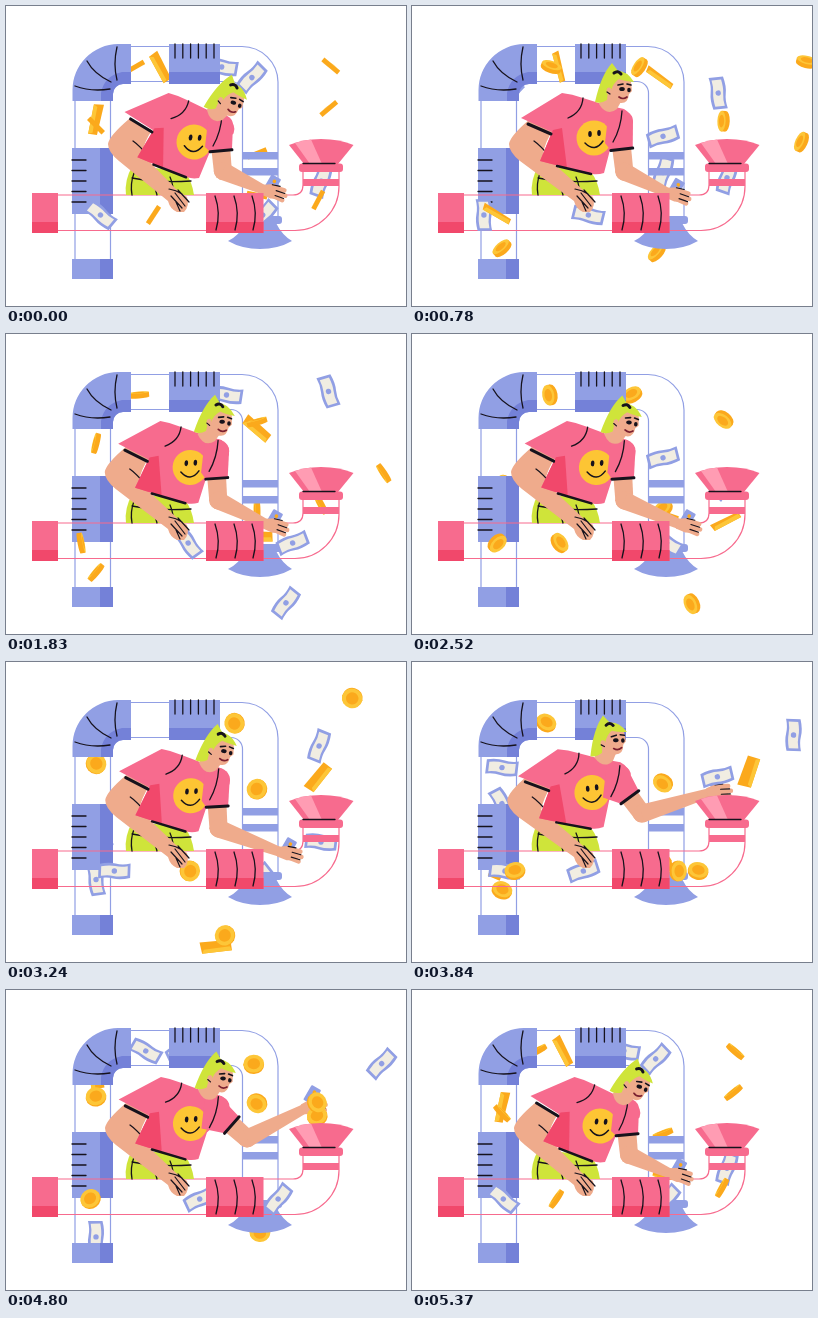
Recreate the animation shown at these times as an HTML page with a canvas. Size 400 px wide and 300 px high, loop 5.4 s.

```html
<!DOCTYPE html>
<html lang="en">
<head>
<meta charset="utf-8">
<title>Money pipes</title>
<style>
html, body { margin: 0; width: 100%; height: 100%; overflow: hidden; background: #fff; }
canvas { display: block; }
</style>
</head>
<body>
<canvas id="stage" width="400" height="300"></canvas>
<script>
const g = document.getElementById('stage').getContext('2d');
const LOOP = 5400, TAU = Math.PI * 2;
const BLUE = '#919fe4', NAVY = '#7481d8', PINK = '#f76b8e', RED = '#f1486b', SKIN = '#efab8c',
  LIME = '#cfe43a', INK = '#16121c', GOLD = '#fba91c', YELLOW = '#fdc638', CREAM = '#f1ede2';
const mod = (a, n) => ((a % n) + n) % n;
const mix = (a, b, k) => a + (b - a) * k;

// ---- drawing helpers
function fill(path, color) { g.fillStyle = color; g.fill(new Path2D(path)); }
function line(path, color = INK, width = 1.3) {
  g.strokeStyle = color; g.lineWidth = width; g.stroke(new Path2D(path));
}
function box(x, y, w, h, color) { g.fillStyle = color; g.fillRect(x, y, w, h); }
function round(x, y, w, h, r, color) {
  g.fillStyle = color; g.beginPath(); g.roundRect(x, y, w, h, r); g.fill();
}
function oval(x, y, rx, ry, color) {
  g.fillStyle = color; g.beginPath(); g.ellipse(x, y, rx, ry, 0, 0, TAU); g.fill();
}
function at(x, y, deg, draw) {
  g.save(); g.translate(x, y); g.rotate(deg * Math.PI / 180); draw(); g.restore();
}
function limb(x1, y1, r1, x2, y2, r2, color) {
  const a = Math.atan2(y2 - y1, x2 - x1), nx = -Math.sin(a), ny = Math.cos(a);
  oval(x1, y1, r1, r1, color);
  oval(x2, y2, r2, r2, color);
  fill(`M${x1 + nx * r1} ${y1 + ny * r1}L${x2 + nx * r2} ${y2 + ny * r2}` +
    `L${x2 - nx * r2} ${y2 - ny * r2}L${x1 - nx * r1} ${y1 - ny * r1}z`, color);
}

// ---- money
const flip = (t, phase = 0) => Math.abs(Math.sin(Math.PI * t / 900 + phase));
const MONEY = {
  bill() {
    const sheet = 'M-16 -6.5Q-6 -9 1 -7.5T16 -8L16 6.5Q6 9 -1 7.5T-16 8z';
    fill(sheet, BLUE);
    g.save(); g.scale(.83, .66); fill(sheet, CREAM); g.restore();
    oval(0, 0, 2.7, 2.7, BLUE);
  },
  coin(t) {
    const w = flip(t), ry = 10.3 * w, o = 2.2 * (1 - w * w) + .2;
    oval(0, o, 10.3, ry, GOLD);
    box(-10.3, -o, 20.6, o * 2, GOLD);
    oval(0, -o, 10.3, ry, YELLOW);
    oval(0, -o, 6.3, ry * .62, GOLD);
  },
  ingot(t) {
    const w = 3 + 8 * flip(t, .5);
    fill(`M-16 -4L15 -5L16 ${w - 3}L-14 ${w - 1}z`, GOLD);
    fill(`M-14 ${w - 1}L16 ${w - 3}L14 ${w - 7}L-12 ${w - 5}z`, YELLOW);
  }
};
// everything tumbles half a turn per loop
function money(kind, turn, x, y, time) {
  at(x, y, turn - time / 30, () => MONEY[kind](mod(time, LOOP)));
}

// kind, time of entry, turn
const BLUE_SPEED = .1265, BLUE_END = 519;
const BLUE_STREAM = [
  ['bill', -2740, -45], ['bill', -2455, 10], ['bill', -663, -110],
  ['ingot', -1970, 65], ['ingot', -1120, 105],
  ['coin', -3370, -22], ['coin', -1770, -30], ['coin', -1070, 45],
  ['coin', 30, 56], ['coin', 680, -15], ['coin', 1700, 11]
];
function bluePoint(u) {
  if (u < 160) return [90, 255 - u];
  if (u < 219) {
    const a = (u - 160) / 59 * Math.PI / 2;
    return [124 - 34 * Math.cos(a), 95 - 34 * Math.sin(a)];
  }
  if (u < 320) return [124 + u - 219, 61];
  if (u < 365) {
    const a = (u - 320) / 45 * Math.PI / 2;
    return [225 + 26 * Math.sin(a), 87 - 26 * Math.cos(a)];
  }
  return [251, 86 + u - 365];
}
function drawBlueStream(t) {
  for (const [kind, start, turn] of BLUE_STREAM) {
    const age = mod(t - start, LOOP), u = age * BLUE_SPEED;
    let [x, y] = bluePoint(Math.min(u, BLUE_END));
    const s = Math.max(0, age - BLUE_END / BLUE_SPEED) / 1000;
    x += 160 * Math.sin(start) * s;
    y += 130 * s + 150 * s * s;
    if (y < 310) money(kind, turn, x, y, start + age);
  }
}

// kind, time of leaving the funnel, turn, launch speed
const PINK_LENGTH = 370;
const PINK_STREAMS = [
  { speed: .105, items: [
    ['bill', 333, -70, 145], ['bill', 1080, -45, 155], ['bill', 2625, 40, 128], ['bill', 3620, -65, 127],
    ['coin', -760, -40, 95], ['coin', 2120, -57, 160]
  ] },
  { speed: .137, items: [['coin', -800, 40, 148], ['coin', 390, -62, 87], ['ingot', 2870, 60, 90]] }
];
function pinkPoint(s) {
  if (s < 289) return [s, 209];
  const a = (s - 289) / 25;
  if (a < Math.PI / 2) return [289 + 26 * Math.sin(a), 182 + 27 * Math.cos(a)];
  return [315, 182 - (s - 328.3)];
}
function flightPoint(kind, lift, s) {
  const [pull, push] = kind === 'bill' ? [60, 95] : [25, 48];
  return [314 - pull * s + push * s * s, 140 - lift * s + 60 * s * s];
}
function drawPinkStreams(t, flying) {
  for (const { speed, items } of PINK_STREAMS) {
    for (const [kind, exit, turn, lift] of items) {
      const lead = (PINK_LENGTH - 40) / speed, age = mod(t - exit + lead, LOOP) - lead;
      if (flying !== age > 0) continue;
      const [x, y] = flying ? flightPoint(kind, lift, age / 1000) : pinkPoint(PINK_LENGTH + age * speed);
      if (x < 420) money(kind, turn, x, y, exit + age);
    }
  }
}

// ---- pipes
function blueLines() {
  line('M69 95V253M104.500 95V253M124 40.500H236A36 36 0 0 1 272 76V212' +
    'M124 75.500H225A11.500 11.500 0 0 1 236.500 87V212', BLUE, 1.2);
}
function blueSolids() {
  fill('M66.500 95V84A46 46 0 0 1 112 38H125V78H117A10 10 0 0 0 107 88V95z', BLUE);
  fill('M125 66V78H117A10 10 0 0 0 107 88V95H95V87Q98 70 116 66z', NAVY);
  line('M69 80Q85 86 104 83M81 55Q88 68 105 76M111 41Q107 58 111 74');
  box(163, 38, 51, 40, BLUE);
  box(163, 66, 51, 12, NAVY);
  for (let i = 0; i < 6; i++) line(`M${169 + i * 7.8} 38v14`);
  box(66, 142, 41, 66, BLUE);
  box(94, 142, 13, 66, NAVY);
  for (let i = 0; i < 5; i++) line(`M66 ${154 + i * 10.5}h14`);
  box(66, 253, 41, 20, BLUE);
  box(94, 253, 13, 20, NAVY);
  box(236, 146, 36, 7.5, BLUE);
  box(236, 162, 36, 7.5, BLUE);
  round(233, 210, 43, 8, 3, BLUE);
  fill('M239 217H270Q276 229 286 235Q272 243 254 243Q236 243 222 235Q234 229 239 217z', BLUE);
}
function pinkLines() {
  line('M52 189H287Q297 189 297 179V165M52 224.500H289A44 44 0 0 0 333 180.500V165', PINK, 1.2);
}
function pinkSolids() {
  for (const [x, w] of [[26, 26], [200, 57.5]]) {
    box(x, 187, w, 40, PINK);
    box(x, 216, w, 11, RED);
  }
  for (const x of [209, 228, 246]) line(`M${x} 190Q${x + 6} 207 ${x + 1} 224`);
  fill('M283 139Q297 133 315 133Q334 133 347.500 139L332 158H298z', PINK);
  fill('M289 137Q297 134 305 133.500L316 158H304z', '#ff9cb3');
  round(293, 157.5, 44, 8.5, 3, PINK);
  line('M297 157.500H329');
  box(297, 173, 36, 7, PINK);
}

// ---- woman: time, lean of the body, wrist
const POSES = [
  [0, 1, 258, 184], [780, 0, 256, 187], [1830, .35, 260, 190],
  [3240, .45, 274, 190], [3840, -.35, 297, 131], [4800, .4, 298, 119]
];
function pose(t) {
  const i = POSES.findLastIndex(p => p[0] <= t), a = POSES[i], b = POSES[(i + 1) % POSES.length];
  const k = (t - a[0]) / ((b[0] || LOOP) - a[0]);
  return a.map((v, j) => mix(v, b[j], k * k * (3 - 2 * k))).slice(1);
}
function smiley() {
  oval(182, 132, 17.5, 17.5, '#fdc534');
  oval(178, 128, 1.8, 3, INK);
  oval(187, 127, 1.8, 3, INK);
  line('M173 137Q183 147 191 135', INK, 1.500);
}
function head() {
  fill('M193 80L211 92L205 103Q195 111 187 98z', SKIN);
  fill('M199 72Q215 66 219 76L220 85L217 88Q216 98 208 97Q199 96 196 84z', SKIN);
  fill('M196 85Q190 70 202 65Q214 63 222 76Q212 75 207 73Q201 77 199 85z', LIME);
  fill('M206 65L200 57Q189 69 183 96Q189 98 195 94Q195 82 206 69z', LIME);
  line('M202 67Q206 64 209 68', INK, 3);
  oval(197, 85, 2.5, 3.5, SKIN);
  line('M195 86l3 2', INK, 1.2);
  line('M206 79l5 -1M215 78l4 1', INK, 1.6);
  oval(210, 83, 2.8, 2, INK);
  oval(217, 84, 1.8, 2.2, INK);
  line('M207 91Q211 94 215 91', '#7a2030', 1.7);
}
function shirt() {
  fill('M109 112L150 87Q160 88 171 92L190 98L212 103Q222 109 220 118L199 140L192 167' +
    'Q186 169 180 168L128 155L140 126z', PINK);
  fill('M141 124L150 122L155 162L128 155z', RED);
  line('M116 118L139 128', INK, 3);
  line('M145 160L179 168', INK, 2.5);
  line('M171 92Q170 106 156 112');
  smiley();
}
function leftArm(dx) {
  const x = n => n + dx;
  fill(`M${x(118)} 113Q${x(98)} 130 ${x(97)} 138Q${x(97)} 146 ${x(108)} 155L162 195Q164 203 171 206` +
    `L178 206Q184 200 181 191L170 183L${x(131)} 148Q${x(133)} 136 ${x(141)} 124z`, SKIN);
  line(`M${x(122)} 135Q${x(128)} 139 ${x(139)} 152`);
  line('M165 190L176 202M169 187L179 200M172 184L183 196M174 205L170 196M163 183Q170 184 176 188', INK, 1.2);
}
function rightHand(x, y, deg) {
  at(x, y, deg, () => {
    fill('M-2 -5L9 -8Q14 -6 18 -3L19 5L8 7L-2 5z', SKIN);
    line('M10 -5L20 -4M12 0L22 1M10 4L20 6', SKIN, 4.5);
    line('M12 -2L21 -1M12 3L21 4M7 -7L15 -7', INK, 1.1);
  });
}
function rightArm(lean, wx, wy) {
  const reach = (188 - wy) / 63, sx = 207 + 6 * lean, sy = 119 + 4 * lean;
  const ex = mix(212 + 3 * lean, 235 + 9 * lean, reach), ey = mix(166, 150, reach);
  limb(mix(sx, ex, .4), mix(sy, ey, .4), 9.5, ex, ey, 9, SKIN);
  limb(ex, ey, 9, wx, wy, 4.8, SKIN);
  at(wx + 8, wy - 6 - 8 * reach, 30, () => {
    round(-5, -8, 11, 17, 1, BLUE);
    oval(1, -3, 1.8, 1.8, GOLD);
  });
  rightHand(wx, wy, Math.atan2(wy - ey, wx - ex) * 90 / Math.PI);
  // sleeve with its cuff half way down the upper arm
  return () => {
    const len = Math.hypot(ex - sx, ey - sy), nx = (ey - sy) / len * 11, ny = (sx - ex) / len * 11;
    const cx = mix(sx, ex, .52), cy = mix(sy, ey, .52);
    fill(`M${sx - 10} ${sy - 17}Q${sx + 14} ${sy - 16} ${sx + 14} ${sy - 4}L${cx + nx} ${cy + ny}` +
      `L${cx - nx} ${cy - ny}L${sx - 14} ${sy + 18}z`, PINK);
    line(`M${cx - nx} ${cy - ny}L${cx + nx} ${cy + ny}`, INK, 3);
    line(`M${sx + 3} ${sy - 14}Q${sx + 2} ${sy + 3} ${sx - 6} ${sy + 17}`);
  };
}
function woman(t) {
  const [lean, wx, wy] = pose(t);
  fill('M127 159L179 166Q186 175 188 189H120Q118 174 127 159z', LIME);
  line('M126 172Q150 177 185 175M128 167Q124 178 126 189M164 171Q168 180 167 189M147 175L151 189');
  const sleeve = rightArm(lean, wx, wy);
  leftArm(5 * lean);
  at(182 + 6 * lean, 132 + 4 * lean, 8 * lean, () => { g.translate(-182, -132); shirt(); });
  sleeve();
  at(205 + 17 * lean, 85 + 12 * lean, 18 * lean, () => { g.translate(-205, -85); head(); });
}

// ---- scene
function clipped(x, draw) {
  g.save();
  g.beginPath(); g.rect(x, 0, 400 - x, 293); g.clip();
  draw();
  g.restore();
}
function frame(now) {
  const t = mod(now, LOOP);
  g.clearRect(0, 0, 400, 300);
  g.lineCap = g.lineJoin = 'round';
  blueLines();
  clipped(52, () => drawBlueStream(t));
  blueSolids();
  pinkLines();
  clipped(40, () => drawPinkStreams(t, false));
  woman(t);
  clipped(40, () => drawPinkStreams(t, true));
  pinkSolids();
  requestAnimationFrame(() => frame(performance.now() - begin));
}
const begin = performance.now();
frame(0);
</script>
</body>
</html>
```
